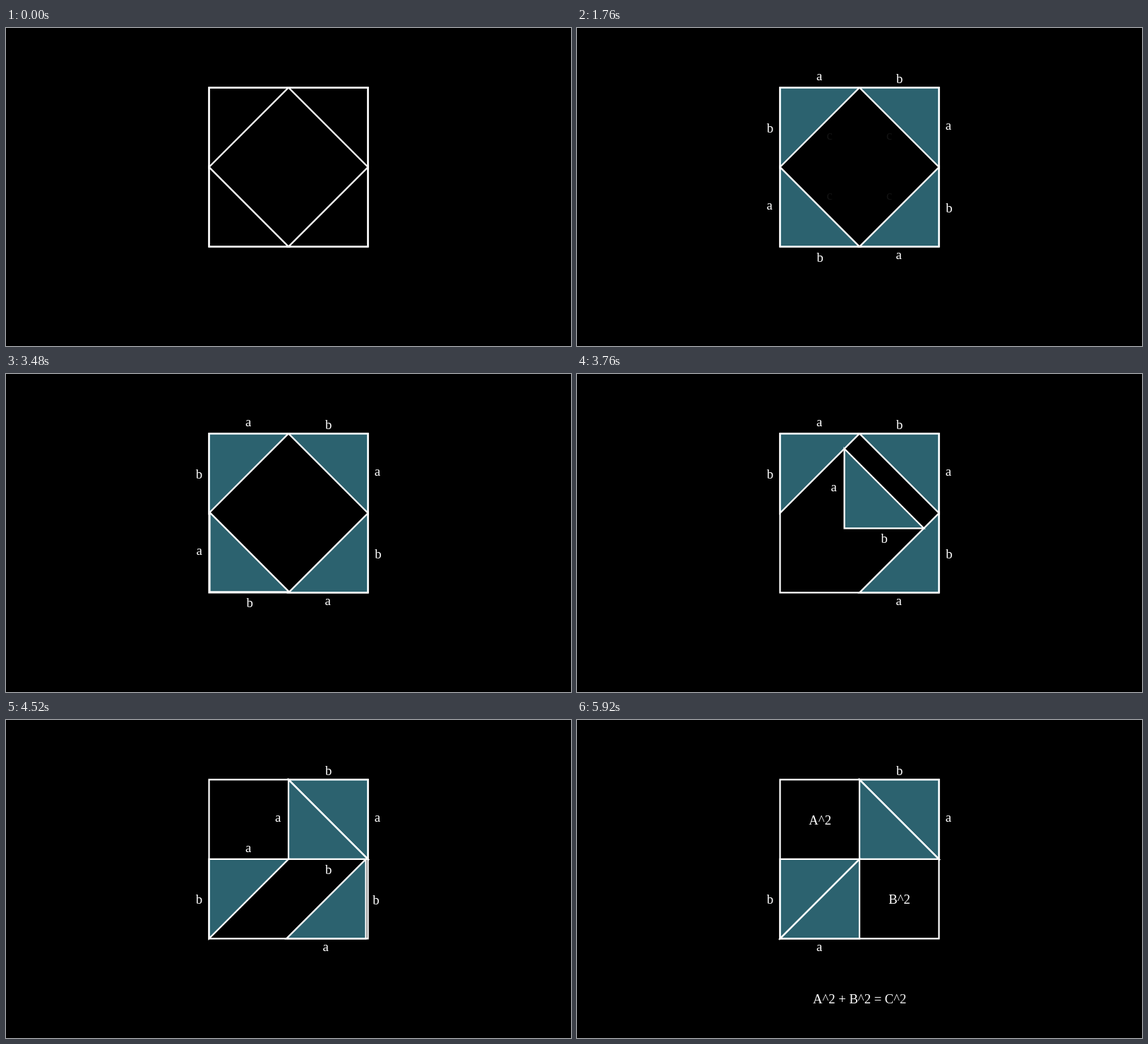
Recreate the animation shown at these times as an HTML page with a canvas. Size 800 px wide and 450 px high, loop 5.94 s.

```html
<!DOCTYPE html>
<html lang="en">
<head>
<meta charset="utf-8">
<title>Rearrangement proof</title>
<style>
  html, body { margin: 0; width: 100%; height: 100%; overflow: hidden; background: #000; }
  canvas { display: block; }
</style>
</head>
<body>
<canvas id="stage" width="800" height="450"></canvas>
<script>
const ctx = document.getElementById('stage').getContext('2d');
const LOOP = 5940;
const H = 112.5;                    // half the side of the big square
const CX = 400, CY = 196.875;
const L = CX - H, R = CX + H, T = CY - H, B = CY + H;

// Each label: text, centre x, centre y, and whether it disappears at the end.
const triangles = [
  { points: [[CX, T], [R, T], [R, CY]], move: [0, 0], start: 0,
    labels: [['b', 456.5, 71], ['a', 526.3, 139.8]] },
  { points: [[L, T], [CX, T], [L, CY]], move: [0, H], start: 3940,
    labels: [['a', 343.5, 69.6, true], ['b', 273.2, 141.3]] },
  { points: [[R, CY], [R, B], [CX, B]], move: [-H, 0], start: 4440,
    labels: [['b', 526.8, 254, true], ['a', 456, 322.6]] },
  { points: [[L, CY], [CX, B], [L, B]], move: [H, -H], start: 3440,
    labels: [['a', 273, 252.3, true], ['b', 344, 324, true]] }
];
const hypotenuseLabels = [[357.6, 153.8], [442, 153.8], [357.6, 238.6], [442, 238.6]];

const clamp = x => Math.min(1, Math.max(0, x));
const progress = (t, start, end) => clamp((t - start) / (end - start));
const sigmoid = x => 1 / (1 + Math.exp(-x));

function smooth(x) {
  const edge = sigmoid(-5);
  return clamp((sigmoid(10 * (x - 0.5)) - edge) / (1 - 2 * edge));
}
const ease = (t, start, end) => smooth(progress(t, start, end));

function path(points) {
  ctx.beginPath();
  points.forEach(([x, y]) => ctx.lineTo(x, y));
  ctx.closePath();
}

// Traces the outline of a glyph, then fills it while the outline thins out.
function drawGlyph(ch, x, y, p) {
  if (p <= 0) return;
  if (p < 1) {
    const fill = clamp(2 * p - 1);
    ctx.lineWidth = Math.max(0.05, 1.1 * (1 - fill));
    ctx.setLineDash(p < 0.5 ? [60 * 2 * p, 200] : []);
    ctx.strokeText(ch, x, y);
    ctx.setLineDash([]);
    ctx.save();
    ctx.globalAlpha *= fill;
    ctx.fillText(ch, x, y);
    ctx.restore();
  } else {
    ctx.fillText(ch, x, y);
  }
}

function drawText(text, cx, cy, written = 1, alpha = 1) {
  if (written <= 0 || alpha <= 0) return;
  const box = ctx.measureText(text);
  const x = cx - (box.actualBoundingBoxRight - box.actualBoundingBoxLeft) / 2;
  const y = cy + (box.actualBoundingBoxAscent - box.actualBoundingBoxDescent) / 2;
  ctx.save();
  ctx.globalAlpha = alpha;
  ctx.fillStyle = ctx.strokeStyle = '#fff';
  if (written >= 1) {
    ctx.fillText(text, x, y);
  } else {
    const lag = 0.2;
    const glyphs = text.replace(/ /g, '').length;
    const span = 1 + lag * (glyphs - 1);
    let index = 0;
    [...text].forEach((ch, i) => {
      if (ch === ' ') return;
      const offset = ctx.measureText(text.slice(0, i)).width;
      drawGlyph(ch, x + offset, y, clamp(written * span - lag * index++));
    });
  }
  ctx.restore();
}

function draw(t) {
  ctx.fillStyle = '#000';
  ctx.fillRect(0, 0, 800, 450);
  ctx.font = '18.7px "Liberation Serif", Times, serif';

  ctx.strokeStyle = '#fff';
  ctx.lineWidth = 2.25;
  ctx.strokeRect(L, T, 2 * H, 2 * H);

  const tint = ease(t, 40, 660);
  const shifts = triangles.map(({ move, start }) => {
    const k = ease(t, start, start + 500);
    return [move[0] * k, move[1] * k];
  });

  triangles.forEach(({ points }, i) => {
    const [dx, dy] = shifts[i];
    path(points.map(([x, y]) => [x + dx, y + dy]));
    ctx.fillStyle = `rgba(88, 196, 221, ${0.5 * tint})`;
    ctx.fill();
    ctx.stroke();
  });

  const written = progress(t, 660, 1260);
  const innerFade = 1 - ease(t, 4940, 5440);
  triangles.forEach(({ labels }, i) => {
    const [dx, dy] = shifts[i];
    labels.forEach(([text, x, y, inner]) =>
      drawText(text, x + dx, y + dy, written, inner ? innerFade : 1));
  });

  const cFade = 1 - ease(t, 1300, 1920);
  hypotenuseLabels.forEach(([x, y]) => drawText('c', x, y, written, cFade));

  drawText('C^2', CX, 197.2, 1, ease(t, 1920, 2520) - ease(t, 2940, 3440));

  const areas = progress(t, 4940, 5440);
  drawText('A^2', 344, 141.2, areas);
  drawText('B^2', 456.3, 253.8, areas);
  drawText('A^2 + B^2 = C^2', CX, 394.2, progress(t, 5440, 5930));
}

const origin = performance.now();
function tick() {
  draw((performance.now() - origin) % LOOP);
  requestAnimationFrame(tick);
}
draw(0);
requestAnimationFrame(tick);
</script>
</body>
</html>
```
